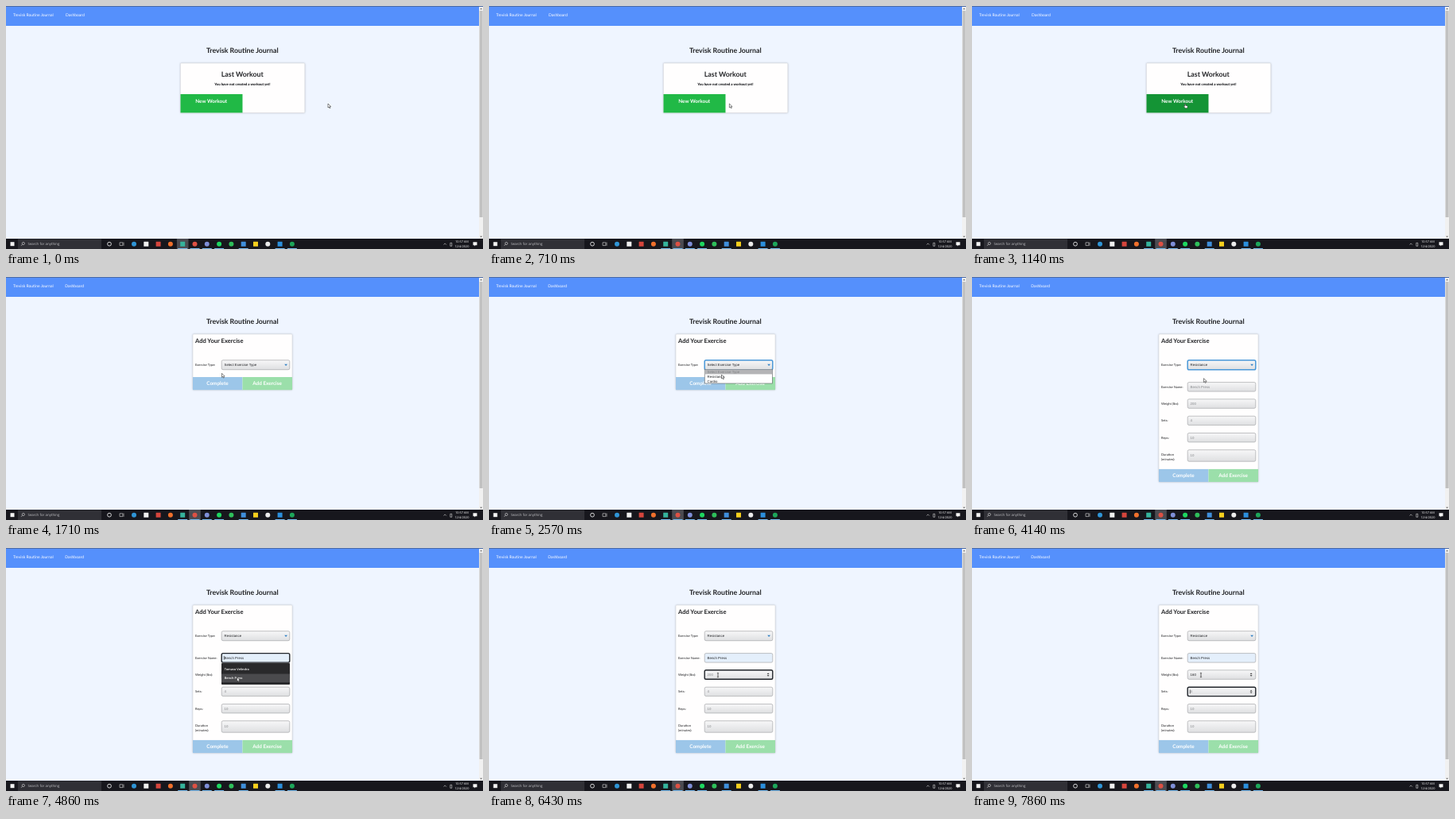
Animation of 600x306 px, one loop 8000 ms. Source, as an HTML page:

```html
<!DOCTYPE html>
<html lang="en">
<head>
<meta charset="utf-8">
<title>Workout form</title>
<style>
  html, body { margin: 0; width: 100%; height: 100%; overflow: hidden; background: #eff5ff; }
  svg { display: block; width: 100%; height: 100%; }
  text { font-family: Lato, sans-serif; fill: #222326; text-rendering: geometricPrecision; white-space: pre; }
  .mid { text-anchor: middle; }
  .nav { font-size: 5px; fill: #fff; }
  .title { font-size: 8.8px; font-weight: 700; }
  .sub { font-size: 7.6px; font-weight: 700; }
  .note { font-size: 4.35px; font-weight: 900; }
  .btn { font-size: 6.4px; font-weight: 700; fill: #fff; text-anchor: middle; }
  .label { font-size: 4.1px; }
  .value, .option { font-family: "Liberation Sans", Arial, sans-serif; font-size: 4.35px; }
  .value.hint { fill: #85878a; }
  .menu { font-family: "Open Sans", sans-serif; font-size: 3.9px; font-weight: 600; fill: #fff; }
  .bar { font-family: "Open Sans", sans-serif; font-size: 4.4px; fill: #c2c2c6; }
  .clock { font-family: "Open Sans", sans-serif; font-size: 3.8px; fill: #fff; text-anchor: middle; }
  .card { fill: #fffefe; stroke: #d3d5da; stroke-width: .5; filter: drop-shadow(0 .5px .8px #0003); }
  .box { fill: url(#metal); stroke: #a6a8ab; stroke-width: .7; }
  .box.filled { fill: #e4effb; }
  .box.focus { stroke: #20242a; stroke-width: 1.4; }
  .box.ring { stroke: #4a98d8; stroke-width: 1.5; }
  .caret { stroke: #111; stroke-width: .6; }
  .pointer { fill: #fff; stroke: #222; stroke-width: .55; stroke-linejoin: round; }
</style>
</head>
<body>
<svg viewBox="0 0 600 306" preserveAspectRatio="none">
  <defs>
    <linearGradient id="metal" x2="0" y2="1">
      <stop offset="0" stop-color="#f7f7f8"/>
      <stop offset="1" stop-color="#dedfe1"/>
    </linearGradient>
  </defs>

  <rect width="600" height="306" fill="#eff5ff"/>
  <rect width="595" height="25" fill="#5590fc"/>
  <rect width="600" height="1" fill="#4c6ba5"/>
  <text class="nav" x="9" y="13.4">Trevisk Routine Journal</text>
  <text class="nav" id="dash" x="75" y="13.4">Dashboard</text>
  <rect x="595" y="1" width="5" height="292" fill="#f1f1f1"/>
  <rect x="595.6" y="6" width="4" height="260" fill="#c1c1c1"/>
  <path d="M596.2 4.2l1.4-1.6 1.4 1.6zM596.2 289.8l1.4 1.6 1.4-1.6z" fill="#606060"/>
  <text class="title mid" x="297.3" y="59.2">Trevisk Routine Journal</text>

  <g id="home">
    <rect class="card" x="219.4" y="72" width="156.4" height="62.5" rx="1"/>
    <text class="title mid" x="297.3" y="89">Last Workout</text>
    <text class="note mid" x="297.4" y="100.4">You have not created a workout yet!</text>
    <rect id="start" x="219.5" y="111" width="78" height="23.4"/>
    <text class="btn" x="258.2" y="121.6">New Workout</text>
  </g>

  <g id="form">
    <rect class="card" id="sheet" x="235" y="72" width="125" rx="1"/>
    <text class="sub" x="238" y="82.6">Add Your Exercise</text>
    <text class="label" x="238" y="112.4">Exercise Type:</text>
    <rect class="box" id="type" x="271.2" y="104.7" width="85.6" height="12" rx="1.8"/>
    <text class="value" id="typeText" x="274.6" y="112.3"></text>
    <path d="M350.2 109.8h3.8l-1.9 2.2z" fill="#2f7fc4"/>
    <g id="fields"></g>
    <g id="actions">
      <rect x="235" width="62.5" height="16.2" fill="#9cc6e9"/>
      <rect x="297.5" width="62.5" height="16.2" fill="#9bdfaa"/>
      <text class="btn" x="266" y="10.3">Complete</text>
      <text class="btn" x="328.6" y="10.3">Add Exercise</text>
    </g>
    <g id="options">
      <rect x="271.2" y="116.4" width="85.2" height="17.6" fill="#fff" stroke="#55585c" stroke-width=".6"/>
      <rect id="mark" x="271.5" width="84.6" height="5.7" fill="#b4b4b6"/>
      <text class="option" x="274.6" y="121.1" style="fill:#808285">Select Exercise Type</text>
      <text class="option" x="274.6" y="126.9">Resistance</text>
      <text class="option" x="274.6" y="132.5">Cardio</text>
    </g>
    <g id="autofill">
      <rect x="271" y="145" width="86" height="27" rx=".8" fill="#29292b"/>
      <rect id="hover" x="271" y="158.5" width="86" height="10.6" fill="#4a4a4d"/>
      <text class="menu" x="274.8" y="154.2">Tomaso Velindra</text>
      <text class="menu" x="274.8" y="165.2">Bench Press</text>
    </g>
  </g>

  <g id="taskbar">
    <rect y="293" width="600" height="13" fill="#17171d"/>
    <rect x="5.5" y="297.2" width="5" height="5" fill="#f2f2f2"/>
    <rect x="15" y="293.4" width="105" height="12.6" fill="#303036"/>
    <g fill="none" stroke="#ddd" stroke-width=".6">
      <circle cx="21.8" cy="299" r="1.6"/>
      <path d="M20.6 300.2l-1.6 1.7M143 297.8h3.8v3.8h-3.8zM148 297.5v4.4M550.6 300.6l1.6-1.7 1.6 1.7M558.8 298.3h2v4h-2z"/>
      <circle cx="130" cy="299.7" r="2.4" stroke="#fff" stroke-width=".8"/>
    </g>
    <text class="bar" x="27.5" y="301.3">Search for anything</text>
    <rect id="active" y="293" width="14.6" height="13" fill="#4b4b51"/>
    <g id="apps"></g>
    <text class="clock" x="573.4" y="298.4">10:57 AM</text>
    <text class="clock" x="573.4" y="304">12/4/2020</text>
    <path d="M587.5 297.2h5v4h-2l-1.2 1.3v-1.3h-1.8z" fill="#f4f4f4"/>
  </g>

  <g id="cursor">
    <path id="arrow" class="pointer" d="M0 0v5l1.2-1 .8 1.8.9-.4-.8-1.7h1.6z"/>
    <path id="hand" class="pointer" d="M0 .4q.6-.8 1.1 0v1.8l2.2.5q.6.3.4 1.2l-.5 1.8h-2.4l-2-2.3q.2-.9 1.2-.1z"/>
    <path id="beam" d="M-1.1-2.6h.8l.3.3.3-.3h.8M0-2.3v4.6M-1.1 2.6h.8l.3-.3.3.3h.8" fill="none" stroke="#222" stroke-width=".7"/>
  </g>
</svg>
<script>
const LOOP = 8000, STEP = 1000 / 7;
const $ = id => document.getElementById(id);
const show = (id, on) => { $(id).style.display = on ? '' : 'none'; };

// Step at which each thing happens
const AT = {
  browser: 2, hover: 6, form: 11, ring: 16, open: 17, mark: 19, chosen: 22,
  name: 31, menu: 32, preview: 34, picked: 36, weight: 39, sets: 54
};
const typed = [[47, '1'], [49, '16'], [50, '160']];

// step, x, y of the pointer
const path = [
  [0, 405, 123], [1, 402, 123], [7, 267.5, 123], [11, 267.5, 123], [15, 293, 112],
  [16, 293, 112], [18, 292.5, 123], [22, 292, 124], [28, 292, 124], [31, 290, 138],
  [32, 290, 138], [34, 290.6, 163], [36, 290.6, 163], [38, 288, 160], [56, 288, 160]
];

// id, label lines, first baseline, box top, box height, hint
const fields = [
  ['name', ['Exercise Name:'], 139.7, 132.6, 11.5, 'Bench Press'],
  ['weight', ['Weight (lbs):'], 161, 153.8, 11.5, '200'],
  ['sets', ['Sets:'], 182.4, 175.2, 11.4, '4'],
  ['reps', ['Reps:'], 203.8, 196.5, 11.4, '10'],
  ['time', ['Duration', '(minutes):'], 225, 217.7, 14.5, '10']
];
$('fields').innerHTML = fields.map(([id, lines, base, top, h, hint]) => {
  const mid = top + h / 2;
  return lines.map((s, i) => `<text class="label" x="238" y="${base + i * 5.9}">${s}</text>`).join('') +
    `<rect class="box" id="${id}Box" x="271.2" y="${top}" width="85.6" height="${h}" rx="1.8"/>
     <text class="value hint" id="${id}Text" x="274.6" y="${mid + 1.5}">${hint}</text>
     <path class="caret" id="${id}Caret" d="M0 ${mid - 2.4}v4.8"/>
     <path id="${id}Spin" d="M349.6 ${mid - .5}h3l-1.5-1.7zM349.6 ${mid + .5}h3l-1.5 1.7z" fill="#444"/>`;
}).join('');

// Taskbar apps: colour, round, running
const apps = [
  ['#2f95d6', 1, 0], ['#f0f0f0', 0, 0], ['#d6453c', 0, 0], ['#f0702c', 1, 0], ['#35b39c', 0, 1],
  ['#dd5144', 1, 1], ['#7f8fd8', 1, 1], ['#1ed760', 1, 1], ['#2fbf5b', 1, 0], ['#3f8fdc', 0, 1],
  ['#f6cf1d', 0, 0], ['#ececec', 1, 0], ['#2b8fdd', 0, 1], ['#1da65a', 1, 1]
];
const appX = i => 161 + i * 15.3;
$('apps').innerHTML = apps.map(([color, round, running], i) =>
  `<rect x="${appX(i) - 3}" y="296.7" width="6" height="6" rx="${round ? 3 : .3}" fill="${color}"/>` +
  (running ? `<rect x="${appX(i) - 6}" y="305" width="12" height="1" fill="#76b9ed"/>` : '')
).join('');

function pointerAt(k) {
  const i = Math.max(1, path.findIndex(p => p[0] >= k));
  const [k0, x0, y0] = path[i - 1], [k1, x1, y1] = path[i];
  const u = (k - k0) / (k1 - k0), e = u * u * (3 - 2 * u);
  return [x0 + (x1 - x0) * e, y0 + (y1 - y0) * e];
}

function drawField(id, text, state) {
  const { real, filled, focus, spin, caret } = state;
  $(id + 'Text').textContent = text;
  $(id + 'Text').setAttribute('class', real ? 'value' : 'value hint');
  $(id + 'Box').setAttribute('class', `box${filled ? ' filled' : ''}${focus ? ' focus' : ''}`);
  show(id + 'Spin', spin);
  show(id + 'Caret', caret);
  const x = real && id === 'weight' ? 275 + text.length * 2.42 : 274.3;
  $(id + 'Caret').setAttribute('transform', `translate(${x})`);
}

function draw(k) {
  const from = name => k >= AT[name];
  const during = (a, b) => from(a) && !from(b);
  const blink = since => Math.floor((k - since) / 3.5) % 2 === 0;

  show('home', !from('form'));
  show('form', from('form'));
  $('dash').setAttribute('x', from('form') ? 74.2 : 75);
  $('start').setAttribute('fill', from('hover') ? '#149435' : '#21b946');
  $('active').setAttribute('x', appX(from('browser') ? 5 : 4) - 7.3);

  const long = from('chosen');
  $('sheet').setAttribute('height', long ? 186 : 70);
  $('actions').setAttribute('transform', `translate(0 ${long ? 241.9 : 126})`);
  show('fields', long);
  show('options', during('open', 'chosen'));
  $('mark').setAttribute('y', from('mark') ? 122.4 : 116.7);
  $('type').setAttribute('class', during('ring', 'name') ? 'box ring' : 'box');
  $('typeText').textContent = long ? 'Resistance' : 'Select Exercise Type';

  const naming = during('name', 'weight'), weighing = during('weight', 'sets');
  const entry = typed.filter(([at]) => k >= at).pop();
  drawField('name', 'Bench Press', {
    real: from('preview'), filled: from('preview'), focus: naming,
    caret: naming && !from('picked') && blink(AT.name)
  });
  drawField('weight', entry ? entry[1] : '200', {
    real: entry, focus: weighing, spin: k >= 37,
    caret: weighing && blink(entry ? entry[0] : AT.weight)
  });
  drawField('sets', '4', { focus: from('sets'), spin: from('sets'), caret: from('sets') });
  drawField('reps', '10', {});
  drawField('time', '10', {});
  show('autofill', during('menu', 'picked'));
  show('hover', from('preview'));

  const [x, y] = pointerAt(k);
  const hand = during('hover', 'form'), beam = k >= 37 || (k >= 30 && k <= 32);
  $('cursor').setAttribute('transform', `translate(${x} ${y})`);
  show('hand', hand);
  show('beam', beam);
  show('arrow', !hand && !beam);
}

let last = -1;
function tick() {
  const k = Math.floor((performance.now() % LOOP + 4) / STEP) % 56;
  if (k !== last) draw(last = k);
  requestAnimationFrame(tick);
}
tick();
</script>
</body>
</html>
```
